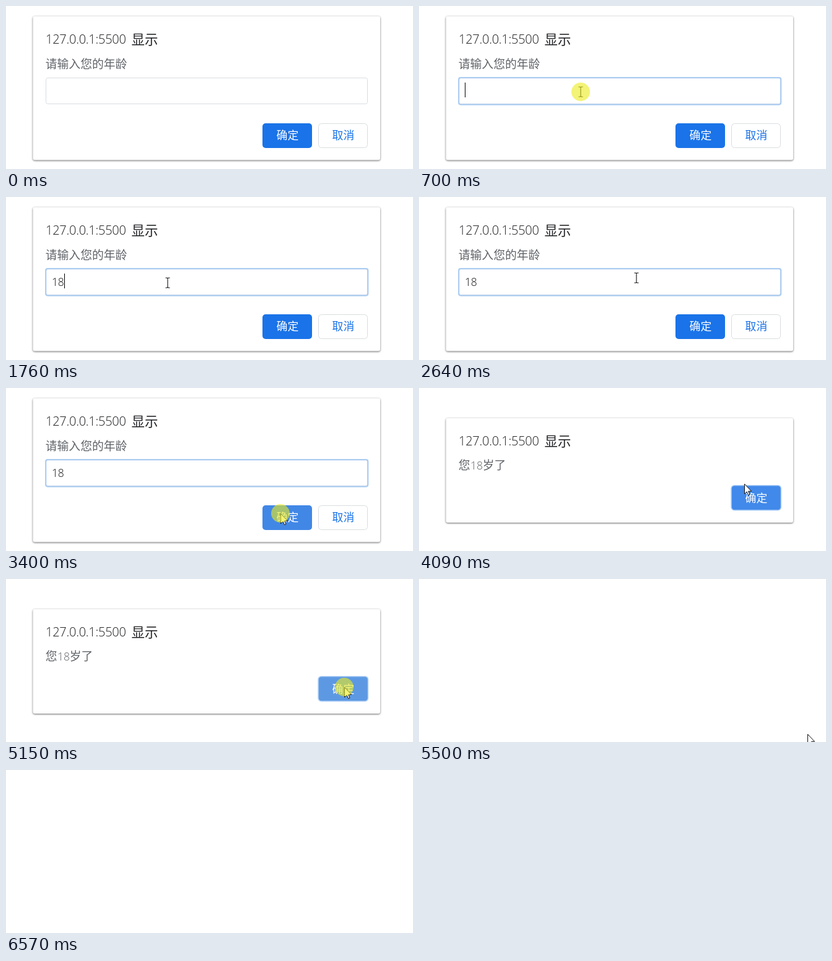
Recreate the animation shown at these times as an HTML page. Size 657x264 px, loop 6640 ms.

```html
<!DOCTYPE html>
<html lang="zh-CN">
<head>
<meta charset="utf-8">
<title>输入年龄</title>
<style>
  html, body { margin: 0; width: 100%; height: 100%; overflow: hidden; background: #fff; }
  svg { display: block; width: 657px; height: 264px; }
  text { font-family: "Open Sans", "Noto Sans", sans-serif; font-weight: 350; white-space: pre; }
  .zh { font-family: "Noto Sans CJK SC", "Noto Sans CJK", sans-serif; font-weight: 300; }
  .panel { fill: #fff; filter: drop-shadow(0 1px 1.5px rgba(0, 0, 0, .6)); }
  .title { fill: #202124; font-size: 20px; letter-spacing: -.25px; }
  .title.zh { font-size: 21.4px; letter-spacing: 0; }
  .label { fill: #5f6368; font-size: 17.6px; }
  .label.zh { font-size: 18.8px; }
  .btn { font-size: 17.9px; fill: #fff; }
  .value { font-size: 17.5px; letter-spacing: -.3px; fill: #111; }
</style>
</head>
<body>
<svg viewBox="0 0 657 264">
  <defs>
    <g id="title">
      <text class="title" x="64" y="61">127.0.0.1:5500</text>
      <text class="title zh" x="202.6" y="61.7">显示</text>
    </g>
  </defs>

  <g id="prompt">
    <rect class="panel" x="43.5" y="16.5" width="560.5" height="233" rx="3"/>
    <use href="#title"/>
    <text class="label zh" x="63.8" y="100.5">请输入您的年龄</text>
    <rect id="field" x="64.5" y="116.5" width="519" height="42" rx="3" fill="#fff" stroke="#dadce0"/>
    <rect id="focus" x="64.2" y="116.2" width="520" height="43.4" rx="3" fill="none" stroke="#acccf1" stroke-width="2.2"/>
    <text id="value" class="value" x="74" y="144"></text>
    <rect id="caret" y="124" width="1" height="24" fill="#000"/>
    <rect id="ok" x="414" y="190" width="80" height="40" rx="5"/>
    <text class="btn zh" x="436.5" y="216.3">确定</text>
    <rect id="cancel" x="504.5" y="190.5" width="79" height="39" rx="5" fill="#fff" stroke="#dadce0"/>
    <text class="btn zh" x="526.5" y="216.3" style="fill:#1a73e8">取消</text>
  </g>

  <g id="alert">
    <rect class="panel" x="43.5" y="48.7" width="560.5" height="169.3" rx="3"/>
    <use href="#title" y="32.2"/>
    <text class="label zh" x="63.8" y="132">您</text>
    <text class="label" x="83" y="132">18</text>
    <text class="label zh" x="102.8" y="132">岁了</text>
    <rect id="close" x="504" y="157.7" width="80.5" height="40.3" rx="5" stroke="#b4d2f7" stroke-width="1.6"/>
    <text class="btn zh" x="526.5" y="184.5">确定</text>
  </g>

  <g id="pointer">
    <path id="arrow" d="M.5 .5V16.5L4.2 13.1 6.6 18.6 9 17.6 6.6 12.2H11.6Z" fill="#fff" stroke="#111" stroke-linejoin="round"/>
    <path id="beam" d="M-3.5-8h2.5l1 1 1-1h2.5M0-7V7M-3.5 8h2.5l1-1 1 1h2.5" fill="none" stroke="#111" stroke-width="1.1"/>
    <circle id="click" r="15" fill="#ebeb1c" opacity=".6"/>
  </g>
</svg>
<script>
const LOOP = 6640, STEP = 70, BLINK = 530;
const FOCUS = 700, KEYS = [1630, 1760];
const CLICKS = [690, 3400, 5150];

// Each glide runs along a quadratic curve and slows down at its end
const glides = [
  { start: 130, end: 690, from: [562, 252], via: [412, 196], to: [261, 139] },
  { start: 2290, end: 2640, from: [261, 139], via: [306, -5], to: [351, 131] },
  { start: 2640, end: 3190, from: [351, 131], via: [440, 150], to: [443, 203] },
  { start: 3800, end: 4080, from: [443, 203], via: [308, 205], to: [525, 155] },
  { start: 4080, end: 4780, from: [525, 155], via: [536, 165], to: [546, 175] },
  { start: 5290, end: 5640, from: [546, 175], via: [594, 220], to: [642, 266] }
];

const $ = id => document.getElementById(id);
const show = (id, on) => { $(id).style.display = on ? '' : 'none'; };
const fade = (id, o) => { $(id).style.opacity = o; show(id, o > 0); };
const ramp = (t, a, b) => Math.min(1, Math.max(0, (t - a) / (b - a)));
const easeOut = k => 1 - (1 - k) ** 2;

function pointerAt(t) {
  const g = glides.filter(g => g.start <= t).pop();
  if (!g) return null;
  const stepped = g.start + Math.floor((t - g.start) / STEP) * STEP;
  const k = easeOut(ramp(stepped, g.start, g.end)), r = 1 - k;
  return g.from.map((a, i) => Math.round(r * r * a + 2 * r * k * g.via[i] + k * k * g.to[i]));
}

function over(id, p, pad = 3) {
  const r = $(id), n = a => +r.getAttribute(a);
  const inside = (v, pos, size) => v >= n(pos) - pad && v <= n(pos) + n(size) + pad;
  return p && inside(p[0], 'x', 'width') && inside(p[1], 'y', 'height');
}

function drawField(t) {
  const typed = KEYS.filter(k => k <= t).length;
  const lastInput = typed ? KEYS[typed - 1] : FOCUS;
  show('focus', t >= FOCUS);
  $('value').textContent = '18'.slice(0, typed);
  $('caret').setAttribute('x', 74 + typed * 10);
  show('caret', t >= FOCUS && (t - lastInput) % (2 * BLINK) < BLINK);
}

function draw(t) {
  const p = pointerAt(t);
  const clicking = CLICKS.some(c => t >= c - STEP && t < c + 2 * STEP);
  fade('prompt', 1 - ramp(t, 3470, 3540));
  fade('alert', ramp(t, 3530, 3600) - ramp(t, 5220, 5290));
  drawField(t);

  $('ok').setAttribute('fill', over('ok', p) ? '#4187e6' : '#1a73e8');
  const lit = clicking ? '#5d99e3' : '#4189ea';
  $('close').setAttribute('fill', over('close', p) ? lit : '#1a73e8');

  show('pointer', p);
  if (!p) return;
  $('pointer').setAttribute('transform', `translate(${p})`);
  const inField = t < 3540 && over('field', p);
  show('beam', inField);
  show('arrow', !inField);
  show('click', clicking);
}

const begin = performance.now();
function tick() {
  draw((performance.now() - begin) % LOOP);
  requestAnimationFrame(tick);
}
tick();
</script>
</body>
</html>
```
